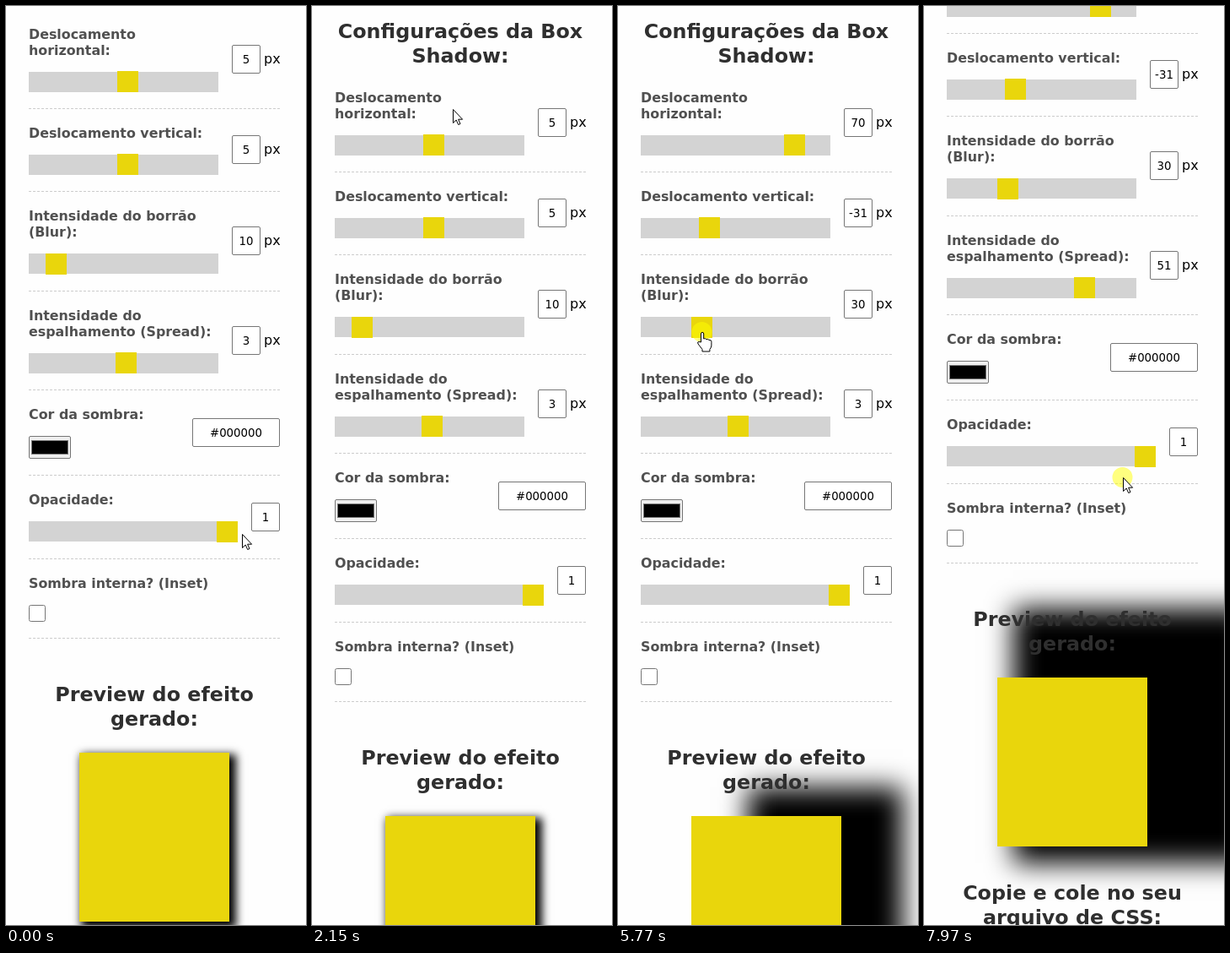
An HTML page for the animation above (8000 ms loop, 356x1088 px).

```html
<!DOCTYPE html>
<html lang="pt">
<head>
<meta charset="utf-8">
<title>Box Shadow</title>
<style>
html, body { margin: 0; width: 100%; height: 100%; overflow: hidden; background: #fefefe; }
body { position: relative; font-family: "DejaVu Sans", sans-serif; }
body * { position: absolute; box-sizing: border-box; }
#page { inset: 0; will-change: transform; }
.text { line-height: 20px; white-space: pre; }
.label { left: 27px; font-size: 15.87px; font-weight: bold; color: #505050; }
.title { left: 0; width: 352px; text-align: center; font-size: 23.8px; font-weight: bold; color: #2f2f2f; }
.code { left: 0; width: 352px; text-align: center; font-size: 16.15px; color: #000; }
.unit { left: 306px; font-size: 16px; color: #000; }
.rule { left: 27px; width: 298px; border-top: 1px dashed #ccc; }
.track { left: 27px; height: 24px; background: #d3d3d3; }
.thumb { width: 25px; height: 25px; background: #e9d60c; }
.field { height: 34px; border: 1px solid #767676; border-radius: 2px; background: #fff;
  font-size: 13.33px; line-height: 33px; text-align: center; color: #000; }
.swatch { left: 27px; width: 50px; height: 27px; border: 1px solid #767676; border-radius: 2px; background: #efefef; }
.swatch div { left: 2px; top: 4px; width: 44px; height: 17px; border: 1px solid #777; background: #000; }
.check { left: 27px; width: 20px; height: 20px; border: 1px solid #767676; border-radius: 2.5px; background: #fff; }
.preview { left: 87px; top: 959px; width: 178px; height: 200px; background: #e9d60c; }
.output { left: 27px; top: 1282px; width: 298px; height: 174px; border: 2px solid #e9d60c; background: #d3d3d3; }
#pointer { left: 0; top: 0; width: 1px; height: 1px; overflow: visible; }
</style>
</head>
<body>
<div id="page"></div>
<svg id="pointer">
  <circle id="halo" cx="-.5" r="12" fill="#ff0" fill-opacity=".5"/>
  <g fill="#fff" stroke="#000" stroke-linejoin="round">
    <path id="arrow" d="M.5.5V16.500L4.200 13l2.500 5.500 2.300-1-2.400-5.300h5z"/>
    <path id="hand" d="M-1.500 12V2a1.600 1.600 0 0 1 3.200 0V8q1.800-1 3.200.6 1.700-.7 3 .8 3-.3 3 2V16q0 2-2 4.500V23H0V20.500L-5 14q-1.200-2.600 1-2.500z"/>
  </g>
</svg>
<script>
const page = document.getElementById('page');
const pointer = document.getElementById('pointer');
const [halo, arrow, hand] = ['halo', 'arrow', 'hand'].map(id => document.getElementById(id));

function add(className, style = {}, text = '', parent = page) {
  const el = document.createElement('div');
  el.className = className;
  for (const key in style) el.style[key] = style[key] + 'px';
  el.textContent = text;
  parent.append(el);
  return el;
}

// Each text line is placed by its vertical centre.
const lines = (kind, centre, step, texts) =>
  texts.forEach((text, i) => add('text ' + kind, { top: Math.round(centre) - 10 + i * step }, text));

const preview = add('preview');
let rowTop = 78.6;

// A settings row: label on the left, field centred on the right, dashed rule below.
function row(label, height, fieldWidth = 0, value = '', unit = '') {
  const texts = label.split('|');
  const top = rowTop;
  const right = unit ? 302 : 325;
  const fieldTop = Math.round(top) + Math.round((height - 34) / 2);
  lines('label', top + 30, 19, texts);
  if (unit) lines('unit', fieldTop + 17, 0, [unit]);
  const field = fieldWidth &&
    add('field', { left: right - fieldWidth, top: fieldTop, width: fieldWidth }, value);
  rowTop += height;
  add('rule', { top: Math.round(rowTop) });
  return { field, controlTop: top + 35.2 + 19.5 * texts.length, width: right - fieldWidth - 43 };
}

function slider(label, height, min, max, value, unit) {
  const { field, controlTop, width } = row(label, height, 34, value, unit);
  const top = Math.round(controlTop);
  const scale = (width - 25) / (max - min);
  add('track', { top, width });
  const thumb = add('thumb', { top: Math.round(controlTop - .5) });
  const set = v => {
    thumb.style.left = 27 + (v - min) * scale + 'px';
    field.textContent = v;
  };
  set(value);
  return { value, set,
    valueAt: x => Math.round(min + (x - 39.5) / scale),
    contains: (x, y) => x >= 27 && x < 27 + width && y >= top && y <= top + 24 };
}

const sliders = [
  slider('Deslocamento|horizontal:', 117.5, -100, 100, 5, 'px'),
  slider('Deslocamento vertical:', 98, -100, 100, 5, 'px'),
  slider('Intensidade do borrão|(Blur):', 117.5, 0, 100, 10, 'px'),
  slider('Intensidade do|espalhamento (Spread):', 117.5, -100, 100, 3, 'px')
];
const color = row('Cor da sombra:', 101.3, 104, '#000000');
add('', {}, '', add('swatch', { top: Math.round(color.controlTop) }));
sliders.push(slider('Opacidade:', 99, 0, 1, 1, ''));
const inset = row('Sombra interna? (Inset)', 93.6);
add('check', { top: Math.round(inset.controlTop) });

lines('title', 30, 29, ['Configurações da Box', 'Shadow:']);
lines('title', 890, 29, ['Preview do efeito', 'gerado:']);
lines('title', 1214, 29, ['Copie e cole no seu', 'arquivo de CSS:']);
add('output');
['box-shadow: 5px 5px 10px 3px|rgba(0, 0, 0, 1);;',
 '-webkit-box-shadow: 5px 5px|10px 3px rgba(0, 0, 0, 1);;',
 '-moz-box-shadow: 5px 5px|10px 3px rgba(0, 0, 0, 1);;'
].forEach((rule, i) => lines('code', 1310 + 46 * i, 19, rule.split('|')));

// Time runs in ticks, 15 per second. A move is [from tick, to tick, ...destination].
const ease = k => (1 - Math.cos(Math.PI * Math.min(1, Math.max(0, k)))) / 2;
const follow = (origin, moves) => tick =>
  moves.reduce((point, [from, to, ...target]) => {
    const k = ease((tick - from) / (to - from));
    return point.map((p, i) => p + (target[i] - p) * k);
  }, origin);

const scrollAt = follow([0], [[-2, 5, 400], [17.3, 22, 0], [115.9, 122.9, 400]]);
const pointerAt = follow([280, 625], [
  [23, 32, 167, 122], [32, 38, 151, 169],
  [41, 44, 209, 169], [44, 47, 193, 188], [47, 53, 138, 287], [53, 58, 136, 271],
  [60, 64, 108, 266], [67, 71, 99, 352], [71, 80, 54, 386],
  [81, 85, 100, 386], [86, 93, 136, 495], [93, 95, 136, 509],
  [99, 101, 187, 496], [101, 103, 190, 496], [109, 117, 236, 558]
]);
// First and last tick of each drag; a thumb trails the pointer by one tick.
const drags = [[42, 44], [61, 64], [82, 85], [98, 103]];

function draw(now) {
  const tick = Math.max(0, Math.floor((now % 8000 - 3) * 15 / 1000));
  const scroll = Math.round(scrollAt(tick)[0]);
  page.style.transform = `translateY(${-scroll}px)`;

  const lengths = drags.map(([first, last], i) => {
    const { value, valueAt, set } = sliders[i];
    const v = tick < first ? value : valueAt(pointerAt(Math.min(tick - 1, last))[0]);
    set(v);
    return v + 'px';
  });
  preview.style.boxShadow = lengths.join(' ') + ' #000';

  const [x, y] = pointerAt(tick).map(Math.round);
  const over = sliders.some(s => s.contains(x, y + scroll));
  pointer.style.transform = `translate(${x}px, ${y}px)`;
  hand.style.display = over ? '' : 'none';
  arrow.style.display = over ? 'none' : '';
  halo.style.display = tick >= 41 ? '' : 'none';
}

const start = performance.now();
function loop() {
  draw(performance.now() - start);
  requestAnimationFrame(loop);
}
loop();
</script>
</body>
</html>
```
